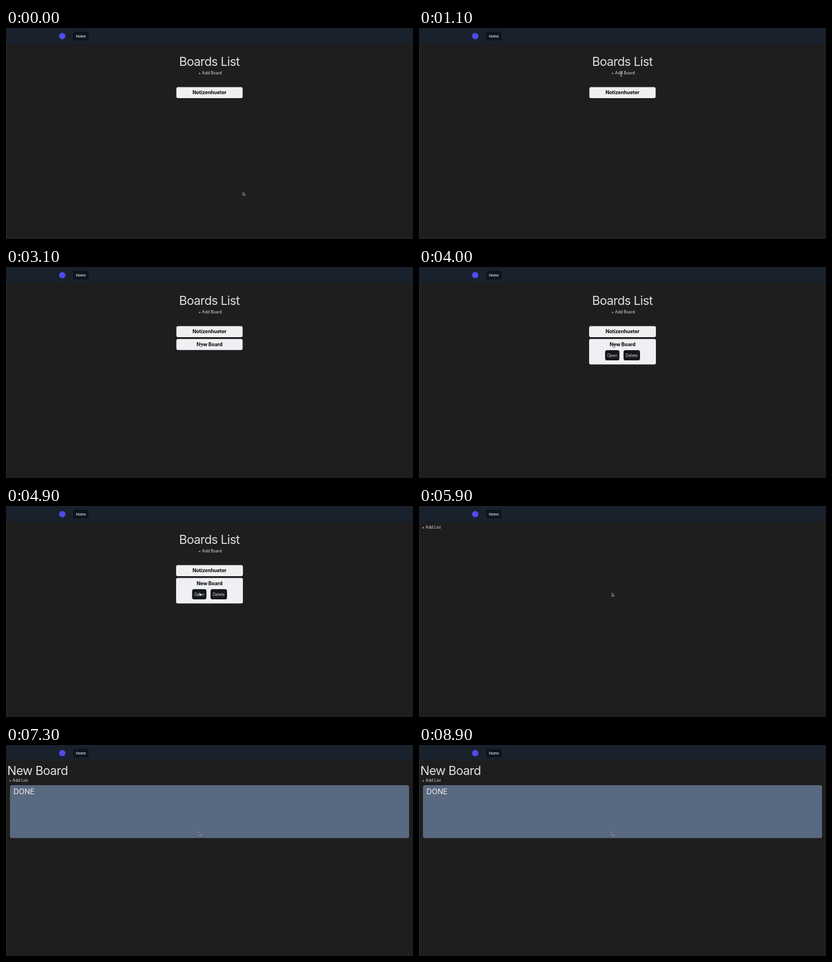
These frames come from a looping animation (720 by 373 pixels, 9100 ms). An HTML page:

```html
<!DOCTYPE html>
<html lang="en">
<head>
<meta charset="utf-8">
<title>Boards</title>
<style>
  html, body { margin: 0; width: 100%; height: 100%; overflow: hidden; background: #1e1e1e; }
  svg { display: block; width: 720px; height: 373px; }
  text { font: 400 7px Inter, sans-serif; font-optical-sizing: none; fill: #e0e0e0; }
  .title { font-size: 21.6px; letter-spacing: -.63px; }
  .mid { text-anchor: middle; }
  .card { font-size: 8.75px; font-weight: 700; letter-spacing: -.08px; fill: #050505; }
  .nav { font-size: 6.125px; font-weight: 500; fill: #f4f4f4; }
  .list { font-size: 13.1px; fill: #f0f1f3; }
  .button { fill: #16171a; }
  #arrow { fill: #111; stroke: #e8e8e8; stroke-width: .6; }
  #hand { fill: #e8e8ea; stroke: #18181a; stroke-width: .5; }
  #beam { fill: none; stroke: #d0d0d0; stroke-width: .8; }
</style>
</head>
<body>
<svg viewBox="0 0 720 373">
  <rect width="720" height="373" fill="#1e1e1e"/>
  <rect y="28" width="1" height="345" fill="#2a2a2a"/>
  <rect width="720" height="27.7" fill="#19212d"/>
  <circle cx="99.5" cy="14.4" r="5.6" fill="#4f4bea"/>
  <rect x="118.8" y="6.4" width="27.4" height="15.7" rx="2.7" fill="#0e141e"/>
  <text class="nav mid" x="132.4" y="16.6">Home</text>

  <g id="overview">
    <text class="title mid" x="359.7" y="67">Boards List</text>
    <text class="mid" x="361" y="82.2">+ Add Board</text>
    <rect id="firstCard" y="104.5" height="19.4" rx="3" fill="#f0f0f0"/>
    <text class="card mid" x="360" y="117.3">Notizenhueter</text>
    <g id="newCard">
      <rect id="newCardBox" y="127.3" rx="3" fill="#eff0f3"/>
      <text class="card mid" x="360" y="140.3">New Board</text>
      <g id="actions">
        <rect id="openButton" class="button" x="329.2" y="147" width="25.4" height="18" rx="3.6" stroke="#646cff" stroke-width=".5"/>
        <text class="mid" x="341.9" y="158.6">Open</text>
        <rect class="button" x="361.8" y="147" width="29.2" height="18" rx="3.6"/>
        <text class="mid" x="376.3" y="158.6">Delete</text>
      </g>
    </g>
  </g>

  <g id="board">
    <text id="addList" x="5" y="39.6">+ Add List</text>
    <g id="loaded">
      <text class="title" x="2.3" y="52.8">New Board</text>
      <rect x="7" y="70.9" width="706" height="93.6" rx="3.5" fill="#59697f"/>
      <text class="list" x="13.2" y="87.4">DONE</text>
    </g>
  </g>

  <g id="cursor">
    <path id="arrow" d="M0 0V6L1.4 4.8 2.3 6.8 3.2 6.4 2.4 4.5H4.2Z"/>
    <path id="hand" d="M.5.6Q1.2-.3 1.7.6V2.4L4 2.9Q4.9 3.2 4.7 4.1L4.2 6.5H1.7L-.2 4Q.1 3.2.8 3.8Z"/>
    <path id="beam" d="M-1.8-4.5Q0-4.5 0-3.4V3.4Q0 4.5-1.8 4.5M1.8-4.5Q0-4.5 0-3.4M1.8 4.5Q0 4.5 0 3.4"/>
  </g>
</svg>
<script>
const LOOP = 9100, STEP = 100;
const CREATED = 2200, EXPANDED = 4000, OPENED = 5600, LOADED = 6100;

// Pointer moves: start, end, destination, shape
const moves = [
  [100, 400, 376, 158, 'arrow'],
  [600, 800, 357, 81, 'beam'],
  [1000, 1300, 359, 81, 'beam'],
  [1800, 2100, 362, 81.5, 'beam'],
  [3000, 3100, 342, 134.5, 'hand'],
  [3100, 3200, 341.5, 149, 'hand'],
  [3300, 3800, 342, 136, 'hand'],
  [4500, 4900, 341.3, 152.2, 'hand'],
  [OPENED, OPENED + STEP, 341.3, 153.6, 'arrow']
];

const el = id => document.getElementById(id);
const show = (id, visible) => el(id).setAttribute('display', visible ? 'inline' : 'none');
const clamp = v => Math.max(0, Math.min(1, v));

function pointerAt(time) {
  let x = 419, y = 289.6, shape = 'arrow';
  for (const [start, end, toX, toY, toShape] of moves) {
    if (time <= start) break;
    const p = clamp((time - start) / (end - start));
    x += (toX - x) * p;
    y += (toY - y) * p;
    if (p === 1 || toShape === 'hand') shape = toShape;
  }
  return { x, y, shape };
}

function draw(time) {
  const expanded = time >= EXPANDED;
  show('overview', time < OPENED);
  show('newCard', time >= CREATED);
  show('actions', expanded);
  show('board', time >= OPENED);
  show('loaded', time >= LOADED);

  for (const id of ['firstCard', 'newCardBox']) {
    el(id).setAttribute('x', expanded ? 300.9 : 301.4);
    el(id).setAttribute('width', expanded ? 118.2 : 117.2);
  }
  el('newCardBox').setAttribute('height', expanded ? 44.9 : 19.4);
  el('openButton').setAttribute('stroke-opacity', clamp((time - 4800) / 300));
  el('addList').setAttribute('y', time >= LOADED ? 64.6 : 39.6);

  const { x, y, shape } = pointerAt(time);
  el('cursor').setAttribute('transform', `translate(${x} ${y})`);
  for (const id of ['arrow', 'hand', 'beam']) show(id, id === shape);
}

const origin = performance.now();
function tick() {
  const time = (performance.now() - origin) % LOOP;
  draw(Math.floor(time / STEP) * STEP);
  requestAnimationFrame(tick);
}
tick();
</script>
</body>
</html>
```
